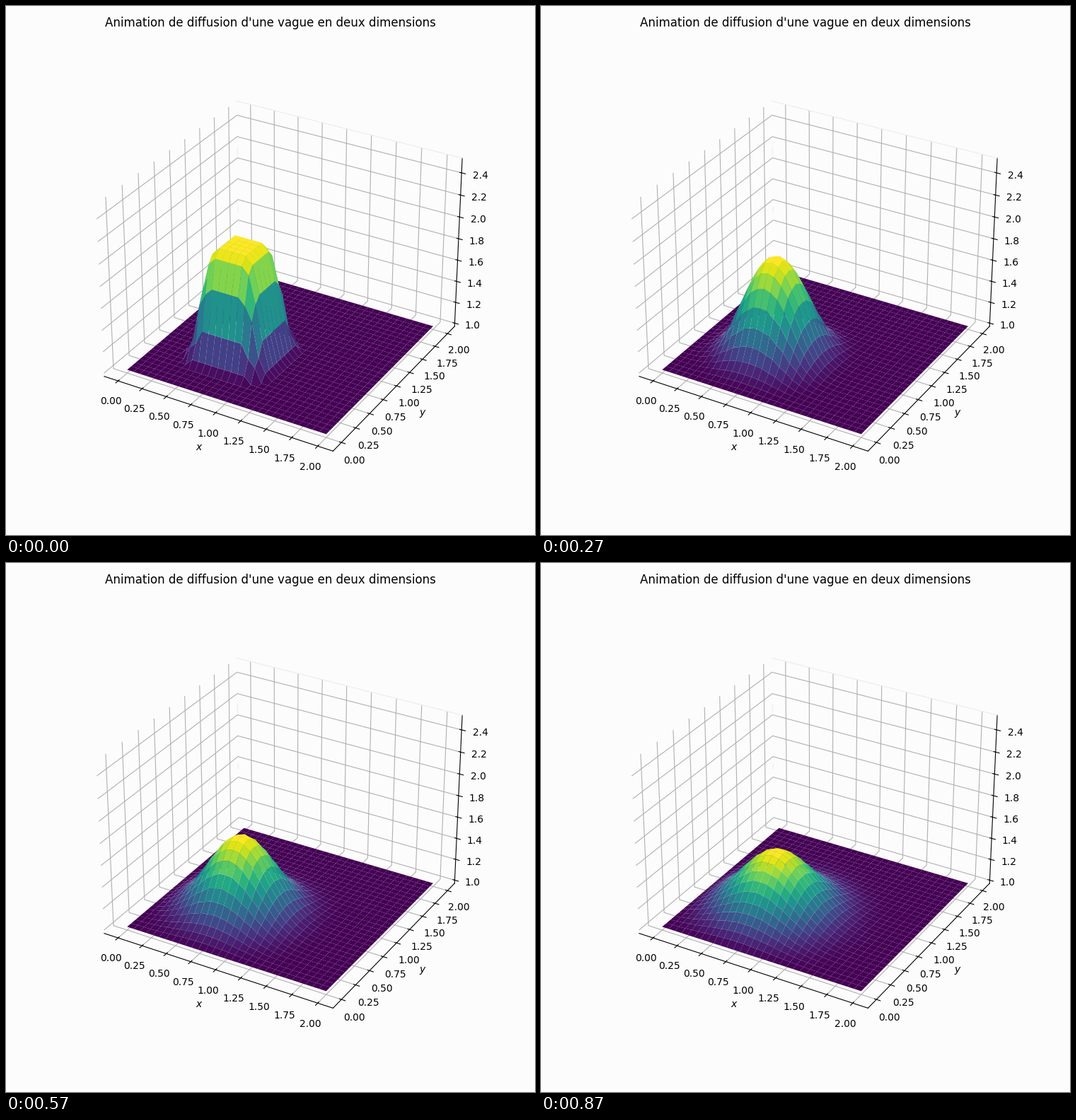
Write a matplotlib script that moves like this. It is 748x748 px and loops after 0.9 s.

```python
import numpy as np
import matplotlib.pyplot as plt
from matplotlib.animation import FuncAnimation

FRAMES, INTERVAL = 30, 30
N = 31                # grid points per side
NU, SIGMA = 0.05, 0.25
PAPER, FAINT = "#fcfcfc", "#ececec"

h = 2 / (N - 1)
dt = SIGMA * h * h / NU
axis_pts = np.linspace(0, 2, N)
X, Y = np.meshgrid(axis_pts, axis_pts)


def diffuse(u):
    """One explicit step of the 2D heat equation, edges held at 1."""
    out = u.copy()
    lap = (u[2:, 1:-1] + u[:-2, 1:-1] + u[1:-1, 2:] + u[1:-1, :-2]
           - 4 * u[1:-1, 1:-1])
    out[1:-1, 1:-1] += NU * dt / h**2 * lap
    return out


def solve():
    u = np.ones((N, N))
    block = slice(int(0.5 / h), int(1 / h + 1.001))
    u[block, block] = 2
    u = diffuse(u)
    states = []
    for _ in range(FRAMES):
        u = diffuse(u)
        states.append(u)
    return states


def padded(lo, hi):
    pad = (hi - lo) / 48
    return lo - pad, hi + pad


states = solve()

fig = plt.figure(figsize=(7.48, 7.48), dpi=100, facecolor=PAPER)
fig.suptitle("Animation de diffusion d'une vague en deux dimensions")
ax = fig.add_subplot(projection="3d", facecolor=PAPER)

side, height = padded(-0.1, 2.1), padded(1, 2.5)
ax.set(xlim=side, ylim=side, zlim=height, xlabel="$x$", ylabel="$y$")
ax.set_xticks(np.arange(0, 2.01, 0.25))
ax.set_yticks(np.arange(0, 2.01, 0.25))
ax.set_zticks(np.arange(1, 2.5, 0.2))
for axis in (ax.xaxis, ax.yaxis, ax.zaxis):
    axis.set_pane_color(PAPER)

# faint traces of the back wall's outline
ax.plot(side, [side[1]] * 2, [height[1]] * 2, color=FAINT, lw=0.8)
for z0, z1 in ((2.02, 2.10), (1.48, 1.53)):
    ax.plot([side[0]] * 2, [side[1]] * 2, [z0, z1], color=FAINT, lw=0.8)

surface = None


def draw(i):
    global surface
    if surface is not None:
        surface.remove()
    surface = ax.plot_surface(X, Y, states[i], cmap="viridis", rstride=1,
                              cstride=1, linewidth=0, antialiased=True)
    return [surface]


anim = FuncAnimation(fig, draw, frames=FRAMES, interval=INTERVAL,
                     init_func=lambda: draw(0), repeat=True, repeat_delay=0)
plt.show()
```
